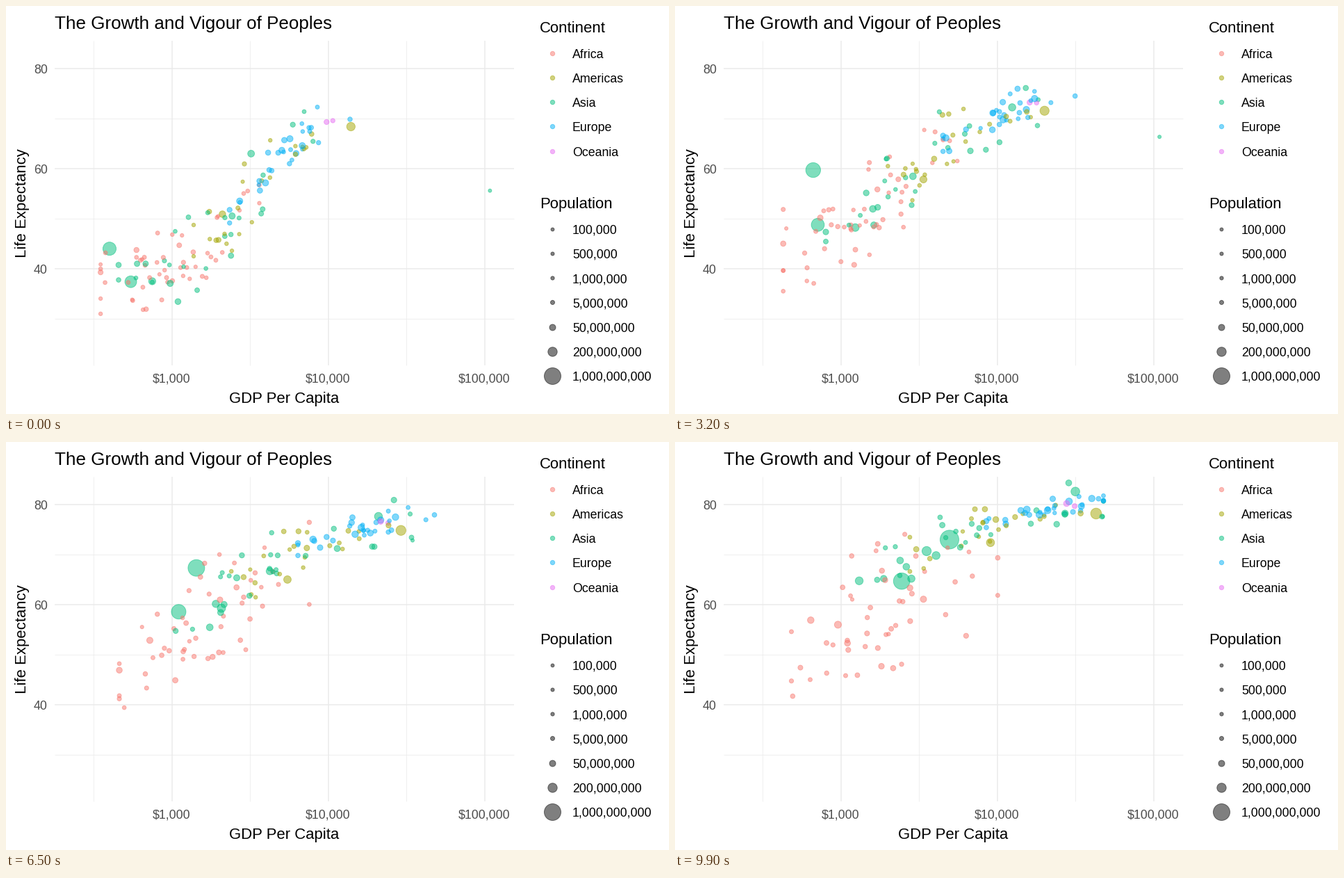
These frames come from a looping animation (954 px wide and 587 px high, 10000 ms). A matplotlib script:

```python
import numpy as np
import matplotlib.pyplot as plt
from matplotlib.animation import FuncAnimation

W, H, DPI = 954, 587, 64
PT = 72 / DPI  # points per pixel
FRAMES = 100
YEARS = np.arange(1952, 2008, 5)
SPAN = (YEARS - 1952) / 55
plt.rcParams["font.family"] = "Liberation Sans"
rng = np.random.default_rng(4)

COLORS = {"Africa": "#F8766D", "Americas": "#A3A500", "Asia": "#00BF7D",
          "Europe": "#00B0F6", "Oceania": "#E76BF3"}
GROWTH = {"Africa": 3.8, "Americas": 2.1, "Asia": 2.4, "Europe": 1.35, "Oceania": 2.2}

# Giants and outliers: continent, millions in 1952, (year, GDP, life) key points
LANDMARKS = [
    ("Asia", 556, (1952, 400, 44), (1962, 488, 44.5), (1967, 613, 58.4),
     (1982, 962, 65.5), (2007, 4959, 73)),
    ("Asia", 400, (1952, 547, 37.4), (1982, 856, 56.6), (2007, 2452, 64.7)),
    ("Asia", 82, (1952, 750, 37.5), (2007, 3541, 70.7)),
    ("Asia", 70, (1952, 3217, 63), (1972, 14779, 73.4), (2007, 31656, 82.6)),
    ("Asia", .2, (1952, 108382, 55.6), (1972, 109348, 67.7),
     (1982, 31354, 71.3), (2007, 47307, 77.6)),
    ("Americas", 152, (1952, 13990, 68.4), (2007, 42952, 78.2)),
    ("Americas", 62, (1952, 2109, 50.9), (2007, 9066, 72.4)),
]
# Count, log GDP at start and end, its spread, life spread at start and end,
# median millions
CROWDS = {
    "Africa": (52, 2.98, 3.25, .29, 4.2, 7.5, 2.8),
    "Americas": (23, 3.50, 3.91, .24, 4.0, 2.2, 3.2),
    "Asia": (28, 3.20, 3.82, .36, 4.5, 2.8, 7.0),
    "Europe": (30, 3.70, 4.36, .22, 2.2, 1.0, 8.0),
    "Oceania": (2, 4.01, 4.47, .02, .1, .4, 4.0),
}


def to_x(log_gdp):
    return 238.5 + 225 * (log_gdp - 3)


def to_y(life):
    return 90 + 7.2 * (80 - life)


def radius(millions):
    return 2.35 + 11.1 * np.sqrt(millions / 1318.7)


def marker_area(r):
    return (2 * r * PT) ** 2


def expected_life(log_gdp):
    """Life expectancy rises with wealth along an S-curve that lifts over time."""
    low, high = 37 + 17 * SPAN, 72 + 11 * SPAN
    steps = (log_gdp - 3.5 + .1 * SPAN) / (.2 + .3 * SPAN)
    return low + (high - low) / (1 + np.exp(-steps))


def wander(n, keep):
    """Standard scores, one row per country, drifting from node to node."""
    z = rng.normal(size=n)
    nodes = []
    for _ in YEARS:
        nodes.append(np.clip((z - z.mean()) / z.std(), -1.5, 2))
        z = keep * z + np.sqrt(1 - keep ** 2) * rng.normal(size=n)
    return np.array(nodes).T


def landmark(continent, pop, *points):
    year, gdp, life = np.array(points).T
    return (np.interp(YEARS, year, np.log10(gdp)),
            np.interp(YEARS, year, life), pop, continent)


def crowd(continent, n, start, end, spread, noise0, noise1, median):
    mean = start + (end - start) * SPAN ** .65
    log_gdp = mean + spread * (1 + .3 * SPAN) * wander(n, .98)
    log_gdp = np.minimum(log_gdp, 4.68)
    life = expected_life(log_gdp)
    life += (noise0 + (noise1 - noise0) * SPAN) * wander(n, .97)
    if continent == "Africa":
        life -= 9 * SPAN ** 2
    pops = np.minimum(median * np.exp(rng.normal(size=n)), 50)
    return [(g, e, p, continent) for g, e, p in zip(log_gdp, life, pops)]


countries = [landmark(*row) for row in LANDMARKS]
others = sum((crowd(name, *row) for name, row in CROWDS.items()), [])
countries += [others[i] for i in rng.permutation(len(others))]
LOG_GDP = np.array([c[0] for c in countries])
LIFE = np.array([c[1] for c in countries])
POP = np.array([c[2] for c in countries])
RATE = np.array([GROWTH[c[3]] for c in countries])

fig = plt.figure(figsize=(W / DPI, H / DPI), dpi=DPI, facecolor="white")
ax = fig.add_axes([0, 0, 1, 1])
ax.set(xlim=(0, W), ylim=(H, 0))
ax.axis("off")


def label(x, y, text, size, color="black", **kw):
    ax.text(x, y, text, fontsize=size * PT, color=color, va="baseline", **kw)


def dots(x, y, r, color):
    return ax.scatter(x, y, s=marker_area(r), c=color, alpha=.5,
                      linewidths=.94 * PT, zorder=3)


def grid(xs, ys, width):
    style = dict(color="#EBEBEB", lw=width * PT, zorder=1)
    ax.vlines(xs, 50, 517, **style)
    ax.hlines(ys, 69.5, 731, **style)


grid([126, 351, 576], [to_y(v) for v in (70, 50, 30)], .8)
grid([238.5, 463.5, 688.5], [to_y(v) for v in (80, 60, 40)], 1.5)
for power in (3, 4, 5):
    label(to_x(power), 541, f"\\${10 ** power:,}", 17.7, "#4D4D4D", ha="center")
for age in (40, 60, 80):
    label(60, to_y(age) + 6.8, str(age), 17.7, "#4D4D4D", ha="right")

label(69.5, 33, "The Growth and Vigour of Peoples", 26)
label(400.5, 571, "GDP Per Capita", 22.1, ha="center")
label(29.5, 284, "Life Expectancy", 22.1, ha="center", rotation=90,
      rotation_mode="anchor")

label(768, 37.5, "Continent", 22.1)
for i, (name, color) in enumerate(COLORS.items()):
    y = 67.7 + 35.2 * i
    dots([786], [y], 3.2, color)
    label(815, y + 7, name, 17.7)

label(768, 291, "Population", 22.1)
for i, millions in enumerate((.1, .5, 1, 5, 50, 200, 1000)):
    y = 320.7 + 35.2 * i
    dots([786], [y], radius(millions), "black")
    label(815, y + 7, f"{int(millions * 1e6):,}", 17.7)

cloud = dots(to_x(LOG_GDP[:, 0]), to_y(LIFE[:, 0]), radius(POP),
             [COLORS[c[3]] for c in countries])


def update(frame):
    progress = frame / (FRAMES - 1)
    pos = progress * (len(YEARS) - 1)
    k = min(int(pos + 1e-9), len(YEARS) - 2)
    t = pos - k
    log_gdp = (1 - t) * LOG_GDP[:, k] + t * LOG_GDP[:, k + 1]
    life = (1 - t) * LIFE[:, k] + t * LIFE[:, k + 1]
    cloud.set_offsets(np.column_stack([to_x(log_gdp), to_y(life)]))
    cloud.set_sizes(marker_area(radius(POP * RATE ** progress)))
    return [cloud]


anim = FuncAnimation(fig, update, frames=FRAMES, interval=100, repeat=True,
                     repeat_delay=0)
plt.show()
```
